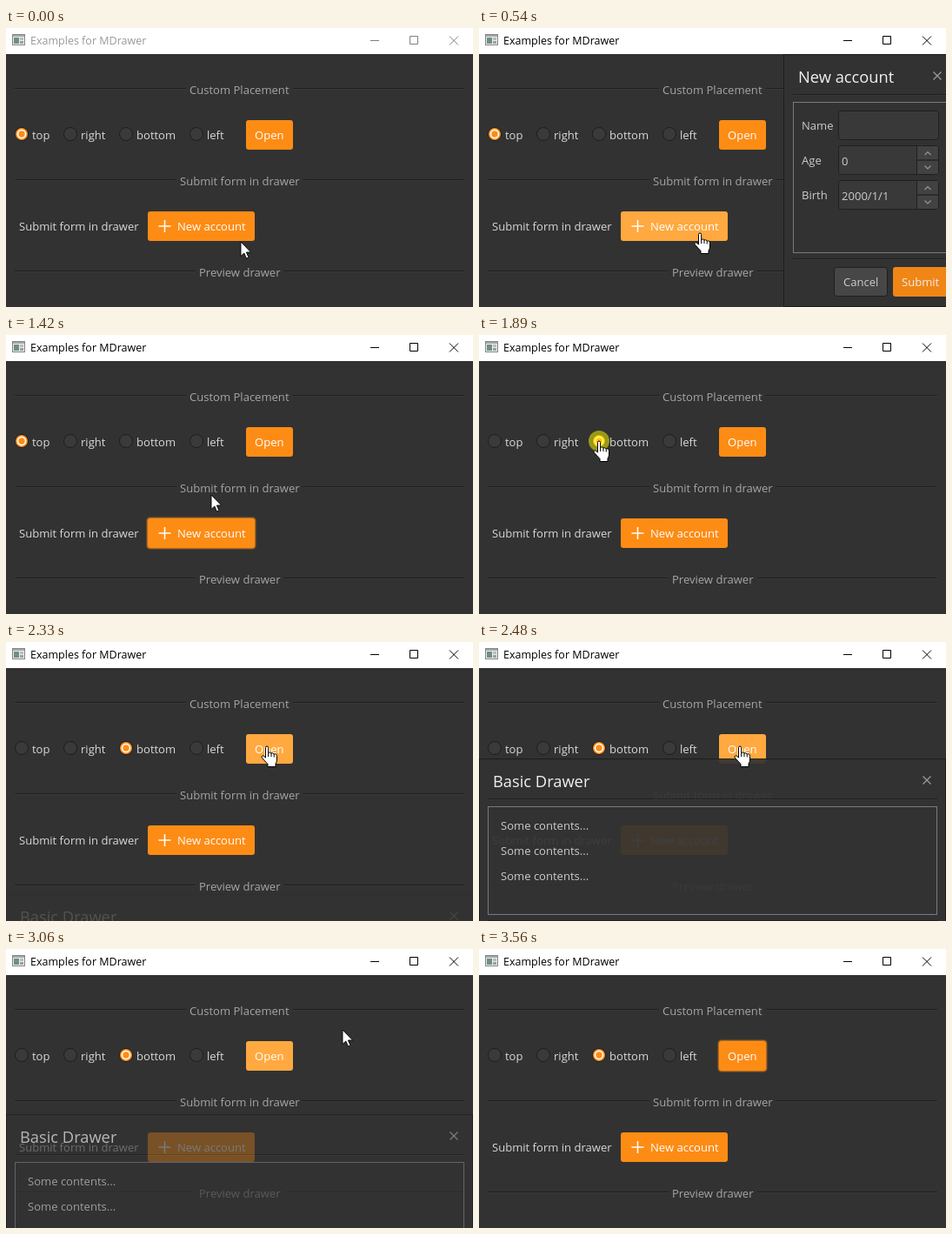
Write an HTML page that moves like this. It is 537 by 321 pixels and loops after 3630 ms.

```html
<!DOCTYPE html>
<html lang="en">
<head>
<meta charset="utf-8">
<title>Drawer examples</title>
<style>
  html, body { margin: 0; width: 100%; height: 100%; overflow: hidden; background: #323232; }
  svg { display: block; width: 537px; height: 321px; }
  text { font: 13.05px "Open Sans", "Noto Sans", sans-serif; fill: #d9d9d9; white-space: pre; }
  .head { font-size: 18.3px; fill: #fff; }
  .muted { fill: #a6a6a6; }
  .white { fill: #fff; }
  .title { font-size: 12.5px; fill: inherit; }
  .line { stroke: none; fill: #1e1e1e; }
  .field { fill: #3a3a3a; stroke: #1e1e1e; }
  .panel { fill: #323232; stroke: #1c1c1c; }
  .frame { fill: none; stroke: #808086; }
  .icon { fill: none; stroke: #a0a0a0; stroke-width: 1.4; }
</style>
</head>
<body>
<svg id="stage" viewBox="0 0 537 321" xmlns="http://www.w3.org/2000/svg"></svg>
<script>
const LOOP = 3630;
const ORANGE = '#fd8c15', HOVER = '#ffa940';
const stage = document.getElementById('stage');
const $ = id => document.getElementById(id);

// Markup helpers
const text = (x, y, s, cls = '') => `<text x="${x}" y="${y}" class="${cls}">${s}</text>`;
const rect = (x, y, w, h, attrs = '') => `<rect x="${x}" y="${y}" width="${w}" height="${h}" ${attrs}/>`;
const rule = (x1, x2, y) => rect(x1, y, x2 - x1, 1, 'class="line"') +
  rect(x1, y + 1, x2 - x1, 1, 'fill="#393939"');
const cross = (x, y, r) => `<path class="icon" d="M${x - r} ${y - r}l${2 * r} ${2 * r}m0 ${-2 * r}l${-2 * r} ${2 * r}"/>`;
const divider = (y, label, x1, x2) => rule(10, x1 - 4, y) + rule(x2 + 4, 527, y) + text(x1, y + 7, label, 'muted');

const button = (id, x, y, w) =>
  `<g id="${id}Glow" fill="${ORANGE}">` +
  rect(x - 2, y - 2, w + 4, 38, 'rx="5" opacity=".22"') +
  rect(x - 1, y - 1, w + 2, 36, 'rx="4" opacity=".5"') + '</g>' +
  rect(x, y, w, 34, `id="${id}" rx="3"`);

const radio = (id, x, label) =>
  `<circle cx="${x}" cy="122" r="7.5" class="field"/>
   <g id="${id}"><circle cx="${x}" cy="122" r="6.2" fill="#fff" stroke="${ORANGE}" stroke-width="1.6"/>
   <circle cx="${x}" cy="122" r="3.7" fill="${ORANGE}"/></g>` + text(x + 12, 128, label);

const spin = y => rect(400.5, y + .5, 115, 33, 'rx="3" class="field"') +
  `<path d="M490.5 ${y + 1}v32M490.5 ${y + 17}h25" stroke="#1e1e1e" fill="none"/>` +
  `<path d="M491 ${y + 1}h22q2 0 2 2v13h-24zM491 ${y + 18}h24v13q0 2-2 2h-22z" fill="#444"/>` +
  `<path class="icon" style="stroke-width:1.1" d="M499.5 ${y + 11}l3.5-3.5 3.5 3.5M499.5 ${y + 23.5}l3.5 3.5 3.5-3.5"/>`;

const titleBar = `<g id="bar">
  ${rect(0, 0, 537, 30, 'fill="#fff"')}
  ${rect(7.5, 7.5, 14, 12, 'fill="#e9ecec" stroke="#858585"')}
  ${rect(8, 8, 13, 2, 'fill="#a3a9ad"')}
  ${rect(9, 11, 6, 7, 'fill="#6f8f84"')}
  ${rect(16, 11, 4, 3, 'fill="#b9bdc0"')}
  ${rect(16, 15, 4, 3, 'fill="#9aa0a4"')}
  ${text(28, 19, 'Examples for MDrawer', 'title')}
  <path id="controls" fill="none" d="M419 14.5h10M464.5 9.5h9v9h-9zM510 9.5l10 10m0-10l-10 10"/></g>`;

const page = divider(69, 'Custom Placement', 211, 326) +
  radio('top', 18, 'top') + radio('right', 74, 'right') +
  radio('bottom', 138, 'bottom') + radio('left', 219, 'left') +
  button('open', 276, 106, 54) + text(286, 128, 'Open', 'white') +
  divider(174, 'Submit form in drawer', 200, 337) +
  text(15, 233, 'Submit form in drawer') +
  button('add', 163, 211, 123) +
  '<path d="M175.5 228h14M182.5 221v14" stroke="#fff" stroke-width="1.5"/>' +
  text(197, 233, 'New account', 'white') +
  divider(279, 'Preview drawer', 222, 316);

const formDrawer = `<g id="form">
  ${rect(337.5, 30.5, 199, 290, 'class="panel"')}
  ${text(354, 63, 'New account', 'head')}${cross(514, 55, 4.5)}
  ${rule(348, 526, 76)}
  ${rect(348.5, 85.5, 177, 173, 'class="frame"')}
  ${text(358, 117, 'Name')}${text(358, 157, 'Age')}${text(358, 197, 'Birth')}
  ${rect(400.5, 95.5, 115, 33, 'rx="3" class="field"')}
  ${spin(135)}${spin(175)}
  ${text(404, 158, '0')}${text(404, 198, '2000/1/1')}
  ${rule(348, 526, 265)}
  ${rect(395.5, 275.5, 61, 33, 'rx="3" fill="#494949" stroke="#1e1e1e"')}
  ${text(406, 297, 'Cancel')}
  ${rect(463, 275, 63, 34, `rx="3" fill="${ORANGE}"`)}
  ${text(473, 297, 'Submit', 'white')}</g>`;

const basicDrawer = `<g id="basic">
  ${rect(.5, 120.5, 536, 199, 'class="panel"')}
  ${text(16, 153, 'Basic Drawer', 'head')}${cross(515, 145, 4.5)}
  ${rule(10, 527, 166)}
  ${rect(10.5, 175.5, 516, 124, 'class="frame"')}
  ${[202, 231, 260].map(y => text(25, y, 'Some contents...')).join('')}
  ${rule(10, 527, 306)}</g>`;

const pointer = `<g id="pointer">
  <circle id="click" r="12" fill="#ff0" opacity=".5"/>
  <path id="arrow" fill="#fff" stroke="#000" stroke-width=".9"
    d="M0 0V16.5L3.8 13 6.4 19 9 17.9 6.4 12H11.6Z"/>
  <path id="hand" fill="#fff" stroke="#000" stroke-linejoin="round"
    d="M-1.5 1.5Q-1.5 0 0 0T1.6 1.5V7.5Q3.8 6.2 5 8 7 7 8.2 9 11.5 8.2 11.5 11.5V16Q11.5 18 10 20V23.5H1V20.5L-5.5 13.5Q-6.8 11.6-5.2 10.8T-1.5 13.2ZM1.6 7.5V12M5 8V12M8.2 9V12.5"/></g>`;

stage.innerHTML = rect(0, 0, 537, 321, 'fill="#323232"') + page + basicDrawer + formDrawer + titleBar + pointer;

// Pointer legs: start, end, from, to
const legs = [
  [15, 90, [270, 246], [254, 236]],
  [750, 980, [254, 236], [236.5, 184]],
  [1410, 1830, [236.5, 184], [138, 122]],
  [1940, 2230, [138, 122], [300, 120]],
  [2470, 2760, [300, 120], [387, 93]],
  [3280, 3560, [387, 93], [437, 323]]
];
const clicks = [[350, 440], [990, 1080], [1830, 1915], [2235, 2320], [2910, 3000]];

const clamp = v => Math.max(0, Math.min(1, v));
const within = (t, a, b) => t >= a && t < b;
const show = (id, on) => $(id).setAttribute('visibility', on ? 'visible' : 'hidden');
const smooth = p => p * p * (3 - 2 * p);

function pointerAt(t) {
  let pos = legs[0][2];
  for (const [a, b, from, to] of legs) {
    if (t < a) break;
    const p = smooth(clamp((t - a) / (b - a)));
    pos = from.map((v, i) => v + (to[i] - v) * p);
  }
  return pos;
}

// Cubic ease out when opening, the same curve reversed when closing
function openness(t, start, settled, close, end) {
  if (t < start || t >= end) return 0;
  if (t < settled) return 1 - (1 - clamp((t - start) / 280)) ** 3;
  return 1 - clamp((t - close) / (end - close)) ** 3;
}

function slide(id, amount, dx, dy) {
  const away = 1 - amount;
  show(id, amount > 0);
  $(id).setAttribute('transform', `translate(${Math.round(dx * away)} ${Math.round(dy * away)})`);
  $(id).setAttribute('opacity', amount);
}

function render(t) {
  const [x, y] = pointerAt(t);
  const active = t >= 350;
  $('bar').setAttribute('fill', active ? '#000' : '#999');
  $('controls').setAttribute('stroke', active ? '#000' : '#808080');

  const chosen = t < 1860 ? 'top' : 'bottom';
  for (const id of ['top', 'right', 'bottom', 'left']) show(id, id === chosen);

  const onAdd = within(x, 163, 286) && within(y, 211, 245);
  const onOpen = within(x, 276, 330) && within(y, 106, 140);
  const onRadio = within(y, 112, 133) &&
    [[10, 52], [66, 116], [130, 197], [211, 251]].some(([a, b]) => within(x, a, b));
  const modal = within(t, 375, 1220) || within(t, 2316, 3120);

  $('add').setAttribute('fill', onAdd || within(t, 375, 1220) ? HOVER : ORANGE);
  $('open').setAttribute('fill', onOpen || within(t, 2316, 3120) ? HOVER : ORANGE);
  show('addGlow', within(t, 1220, 1830));
  show('openGlow', t >= 3120);

  slide('form', openness(t, 375, 600, 1020, 1220), 200, 0);
  slide('basic', openness(t, 2316, 2600, 2920, 3120), 0, 200);

  const hand = onAdd || onOpen || (onRadio && !modal);
  const visible = t < 3560;
  $('pointer').setAttribute('transform', `translate(${Math.round(x)} ${Math.round(y)})`);
  show('arrow', visible && !hand);
  show('hand', visible && hand);
  show('click', clicks.some(([a, b]) => within(t, a, b)));
}

const began = performance.now();
function tick() {
  render((performance.now() - began) % LOOP);
  requestAnimationFrame(tick);
}
tick();
</script>
</body>
</html>
```
